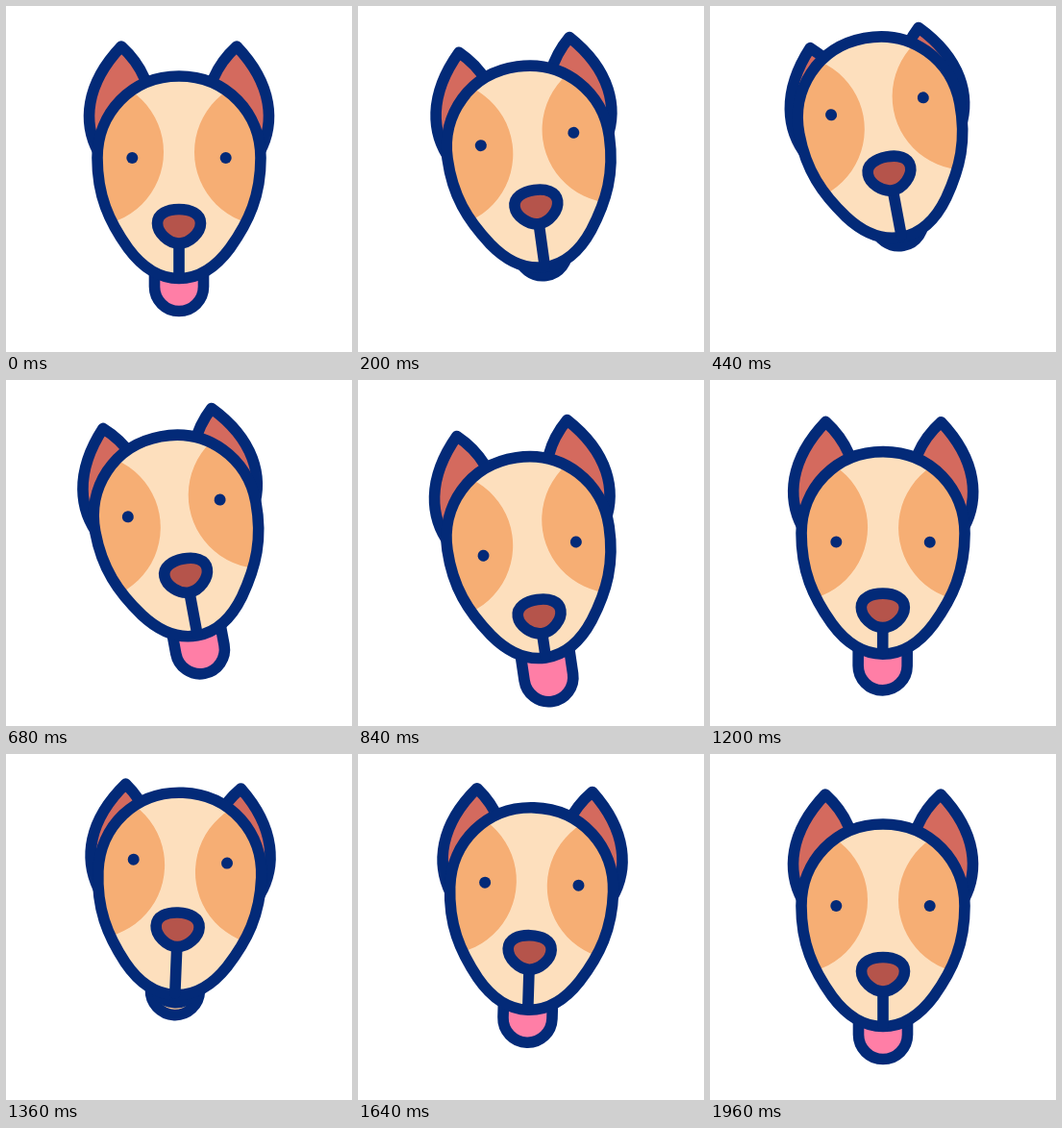
Recreate the animation shown at these times as an HTML page with a canvas. Size 360 by 360 pixels, loop 2000 ms.

```html
<!DOCTYPE html>
<html lang="en">
<head>
<meta charset="utf-8">
<title>Dog</title>
<style>
html, body { margin: 0; width: 100%; height: 100%; overflow: hidden; background: #fff; }
canvas { display: block; width: 360px; height: 360px; }
</style>
</head>
<body>
<canvas id="stage" width="360" height="360"></canvas>
<script>
const ctx = document.getElementById('stage').getContext('2d');
const LOOP = 2000, STEP = 40;
const INK = '#032a78', SKIN = '#fddfbd', PATCH = '#f6ae74', EAR = '#d46a5e',
      NOSE = '#b5544b', TONGUE = '#ff7ea6', JAW = '#fdc691';

const head = new Path2D('M180 73C130 73 95 112 95 158C95 197 107 224 127 252' +
  'C141 271 158 283.5 180 283.5C202 283.5 219 271 233 252C253 224 265 197 265 158' +
  'C265 112 230 73 180 73Z');
const ear = new Path2D('M96 152C80 122 82 82 120 42C131 52 138 61 144 75L150 110L112 150Z');
const nose = new Path2D('M157.5 226C157.5 216 168 211.5 180 211.5' +
  'C192 211.5 202.5 216 202.5 226C202.5 236 191 247 180 247C169 247 157.5 236 157.5 226Z');
const lobe = new Path2D('M154.5 255V292A25.5 25.5 0 0 0 205.5 292V255Z');

// Eased change from 0 to amount between two times
function ramp(t, start, end, amount) {
  const u = Math.min(1, Math.max(0, (t - start) / (end - start)));
  return amount * u * u * (3 - 2 * u);
}

// Up with a tilt, down, up again, then settle
function pose(t) {
  const y = ramp(t, 100, 400, -42) + ramp(t, 400, 1020, 61) +
            ramp(t, 1080, 1400, -55) + ramp(t, 1300, 1960, 36);
  return {
    y,
    ears: 0.74 * Math.max(0, -y),
    tilt: ramp(t, 0, 300, -10.6) + ramp(t, 640, 1400, 13) + ramp(t, 1480, 1960, -2.4),
    face: ramp(t, 0, 320, -13) + ramp(t, 600, 1000, 37) +
          ramp(t, 1080, 1360, -38) + ramp(t, 1300, 1900, 14),
    tongue: ramp(t, 0, 180, -25) + ramp(t, 440, 760, 37) +
            ramp(t, 1140, 1340, -38) + ramp(t, 1360, 1620, 26),
    jaw: -26 + ramp(t, 1200, 1360, 13) + ramp(t, 1400, 1640, -13)
  };
}

function at(dx, dy, draw) {
  ctx.save();
  ctx.translate(dx, dy);
  draw();
  ctx.restore();
}

function mirrored(draw) {
  draw();
  ctx.save();
  ctx.translate(360, 0);
  ctx.scale(-1, 1);
  draw();
  ctx.restore();
}

function paint(path, fill) {
  ctx.fillStyle = fill;
  ctx.fill(path);
  ctx.stroke(path);
}

function disc(x, y, r, fill) {
  ctx.fillStyle = fill;
  ctx.beginPath();
  ctx.arc(x, y, r, 0, 2 * Math.PI);
  ctx.fill();
}

function drawSkull() {
  ctx.save();
  ctx.clip(head);
  ctx.fillStyle = SKIN;
  ctx.fill(head);
  mirrored(() => disc(87.4, 152, 76.6, PATCH));
  ctx.restore();
  ctx.stroke(head);
}

function drawFace(dy) {
  ctx.beginPath();
  ctx.moveTo(180, 244 + dy);
  ctx.lineTo(180, 282);
  ctx.stroke();
  at(0, dy, () => {
    paint(nose, NOSE);
    mirrored(() => disc(131.3, 158, 6, INK));
  });
}

function render(t) {
  const p = pose(t);
  ctx.fillStyle = '#fff';
  ctx.fillRect(0, 0, 360, 360);
  ctx.strokeStyle = INK;
  ctx.lineWidth = 11.6;
  ctx.lineJoin = ctx.lineCap = 'round';

  ctx.save();
  ctx.translate(180, 178 + p.y);
  ctx.rotate(p.tilt * Math.PI / 180);
  ctx.translate(-180, -178);

  at(0, p.jaw, () => paint(lobe, JAW));
  at(0, p.tongue, () => paint(lobe, TONGUE));
  const squeeze = Math.max(0, -p.tilt) / 4;
  mirrored(() => at(squeeze, p.ears, () => paint(ear, EAR)));
  drawSkull();
  drawFace(p.face);
  ctx.restore();
}

function tick() {
  const t = performance.now() % LOOP;
  render(Math.floor(t / STEP) * STEP);
  requestAnimationFrame(tick);
}
tick();
</script>
</body>
</html>
```
